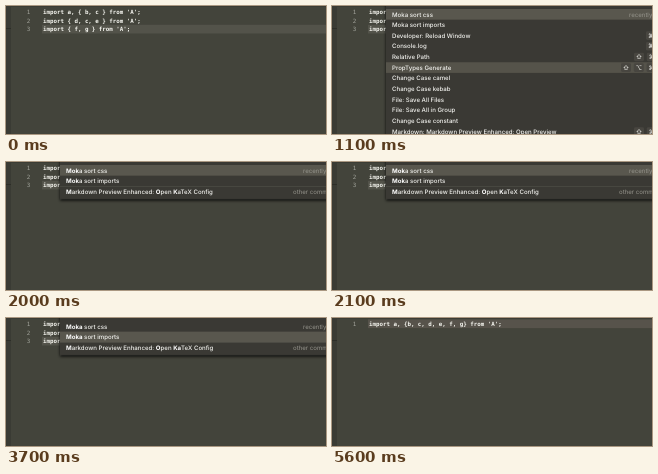
These frames come from a looping animation (320 by 128 pixels, 6 s). An HTML page:

```html
<!DOCTYPE html>
<html lang="en">
<head>
<meta charset="utf-8">
<title>Sorting imports</title>
<style>
  html, body { margin: 0; width: 100%; height: 100%; overflow: hidden; background: #43443b; }
  svg { display: block; width: 100vw; height: 100vh; }
  text { white-space: pre; text-rendering: geometricPrecision; }
  .code { font: bold 5.81px "DejaVu Sans Mono", monospace; fill: #f6f6f0; }
  .number { font: 5.81px "DejaVu Sans Mono", monospace; fill: #a3a49c; text-anchor: end; }
  .item { font: 500 6.1px Inter, sans-serif; fill: #f4f4f0; }
  .match { font-weight: 700; fill: #fff; }
  .hint { font: 6.1px Inter, sans-serif; fill: #95948c; }
  .key { font: 500 6.2px Inter, "DejaVu Sans", sans-serif; fill: #ecebe6; text-anchor: middle; }
</style>
</head>
<body>
<svg id="stage" viewBox="0 0 320 128" preserveAspectRatio="none">
  <defs>
    <filter id="blur" x="-10%" y="-30%" width="120%" height="160%"><feGaussianBlur stdDeviation="1.5"/></filter>
  </defs>
  <rect width="320" height="128" fill="#43443b"/>
  <rect width="320" height="1" fill="#3b3c34"/>
  <rect width="5" height="128" fill="#3a3b34"/>
  <rect y="22" width="5" height="1" fill="#2d2e28"/>
</svg>
<script>
const LOOP = 6000;
const LINE_H = 8.7, CHAR_W = 3.5, CODE_X = 37;
const ROW_H = 10.65, LIST_X = 54, LIST_Y = 3;
const stage = document.getElementById('stage');

function add(parent, tag, attrs = {}, content = '') {
  const node = document.createElementNS('http://www.w3.org/2000/svg', tag);
  for (const name in attrs) node.setAttribute(name, attrs[name]);
  node.textContent = content;
  parent.appendChild(node);
  return node;
}

function makeEditor(lines, active, highlight) {
  const group = add(stage, 'g');
  add(group, 'rect', { x: 36, y: 1.4 + active * LINE_H, width: 284, height: LINE_H, fill: highlight });
  lines.forEach((line, i) => {
    const y = 8 + i * LINE_H;
    add(group, 'text', { x: 24.3, y, class: 'number' }, i + 1);
    add(group, 'text', { x: CODE_X, y, class: 'code' }, line);
  });
  const cursor = add(group, 'rect', {
    x: CODE_X + lines[active].length * CHAR_W, y: 1.6 + active * LINE_H,
    width: 0.9, height: 8.2, fill: '#f0f0ea'
  });
  return { group, cursor };
}

function addKeys(group, keys, x, middle) {
  [...keys].forEach((key, i) => {
    const left = x + i * 12.8;
    add(group, 'rect', { x: left - 5, y: middle - 4.3, width: 10, height: 8.6, rx: 1.4, fill: '#484640' });
    add(group, 'text', { x: left, y: middle + 2.2, class: 'key' }, key);
  });
}

// Each row is [label with *matched* parts, shortcut keys, x of the first key].
function makePalette(rows, { hover = -1, other = -1 } = {}) {
  const group = add(stage, 'g');
  const box = { x: LIST_X, y: -20, width: 290, height: 20 + LIST_Y + rows.length * ROW_H + 2 };
  add(group, 'rect', { ...box, y: box.y + 1.5, fill: '#0c0c08', opacity: 0.9, filter: 'url(#blur)' });
  add(group, 'rect', { ...box, fill: '#3a3934' });
  if (hover >= 0) {
    add(group, 'rect', { x: LIST_X, y: LIST_Y + hover * ROW_H, width: 266, height: ROW_H, fill: '#55534a' });
  }
  const selection = add(group, 'rect', { x: LIST_X, width: 266, height: ROW_H, fill: '#59574e' });
  rows.forEach(([label, keys = '', keyX = 0], i) => {
    const middle = LIST_Y + (i + 0.5) * ROW_H;
    const text = add(group, 'text', { x: 60, y: middle + 2.2, class: 'item' });
    label.split('*').forEach((part, n) => {
      if (part) add(text, 'tspan', n % 2 ? { class: 'match' } : {}, part);
    });
    addKeys(group, keys, keyX, middle);
  });
  add(group, 'text', { x: 297, y: LIST_Y + 7.5, class: 'hint' }, 'recently used');
  if (other >= 0) {
    const y = LIST_Y + other * ROW_H;
    add(group, 'rect', { x: LIST_X, y, width: 266, height: 0.5, fill: '#55544d' });
    add(group, 'text', { x: 287, y: y + 7.5, class: 'hint' }, 'other commands');
  }
  return { group, selection };
}

const before = makeEditor([
  "import a, { b, c } from 'A';",
  "import { d, c, e } from 'A';",
  "import { f, g } from 'A';"
], 2, '#53534a');
const after = makeEditor(["import a, {b, c, d, e, f, g} from 'A';"], 0, '#57534b');

const allCommands = makePalette([
  ['Moka sort css'],
  ['Moka sort imports'],
  ['Developer: Reload Window', '⌘', 319],
  ['Console.log', '⌘', 319],
  ['Relative Path', '⇧⌘', 307],
  ['PropTypes Generate', '⇧⌥⌘', 294],
  ['Change Case camel'],
  ['Change Case kebab'],
  ['File: Save All Files'],
  ['File: Save All in Group'],
  ['Change Case constant'],
  ['Markdown: Markdown Preview Enhanced: Open Preview', '⇧⌘', 307]
], { hover: 5 });

const typedM = makePalette([
  ['*M*oka sort css'],
  ['*M*oka sort imports'],
  ['Change Case ca*m*el'],
  ['*M*arkdown: Markdown Preview Enhanced: Open Preview', '⇧⌘', 307],
  ['For*m*at Document', '⇧⌥', 307],
  ['*M*arkdown Preview Enhanced: Create TOC'],
  ['Docu*m*ent This', '⌃⌥D⌃⌥', 267],
  ['Explorer: Focus on Ti*m*eline View'],
  ['Preferences: Color The*m*e', '⌘K⌘', 293],
  ['*M*arkdown: Open Preview to the Side'],
  ['Project *M*anager: Save Project'],
  ["Shell Co*m*mand: Install 'code' command in PATH"]
], { hover: 5 });

const typedMok = makePalette([
  ['*Mok*a sort css'],
  ['*Mok*a sort imports'],
  ['*M*arkdown Preview Enhanced: *O*pen *K*aTeX Config']
], { other: 2 });

const typedMoka = makePalette([
  ['*Moka* sort css'],
  ['*Moka* sort imports'],
  ['*M*arkdown Preview Enhanced: *O*pen *Ka*TeX Config']
], { other: 2 });

const palettes = [
  { view: allCommands, from: 900, to: 1500 },
  { view: typedM, from: 1500, to: 2000 },
  { view: typedMok, from: 2000, to: 2300 },
  { view: typedMoka, from: 2300, to: 4100 }
];

const show = (node, opacity) => {
  node.style.display = opacity > 0 ? '' : 'none';
  node.style.opacity = opacity;
};

// Opacity of something visible between two times, at half strength for its first and last 100 ms.
const pulse = (t, from, to) =>
  t < from || t >= to ? 0 : t < from + 100 || t >= to - 100 ? 0.5 : 1;

function render(t) {
  const sorted = t >= 4100;
  show(before.group, sorted ? 0 : 1);
  show(after.group, sorted ? 1 : 0);
  show(before.cursor, pulse(t, 100, 600));
  show(after.cursor, Math.max(pulse(t, 4000, 4600), pulse(t, 5000, 5600)));

  const opacity = pulse(t, 900, 4100);
  const selected = t < 3400 ? 0 : 1;
  for (const { view, from, to } of palettes) {
    show(view.group, t >= from && t < to ? opacity : 0);
    view.selection.setAttribute('y', LIST_Y + selected * ROW_H);
  }
}

const start = performance.now();
function tick() {
  render((performance.now() - start) % LOOP);
  requestAnimationFrame(tick);
}
tick();
</script>
</body>
</html>
```
